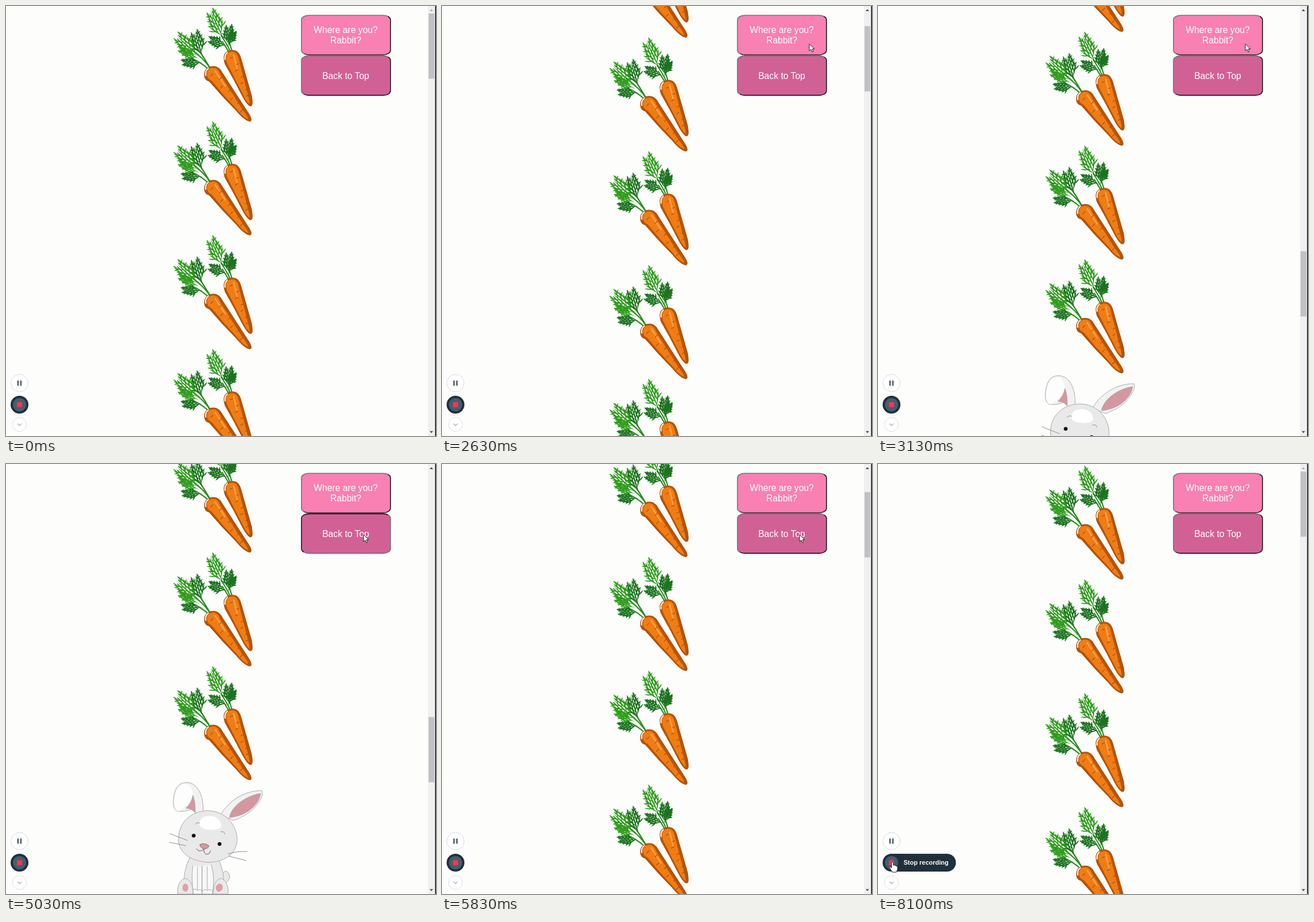
Write an HTML page that moves like this. It is 748 by 748 pixels and loops after 8170 ms.

```html
<!DOCTYPE html>
<html lang="en">
<head>
<meta charset="utf-8">
<title>Where is the rabbit?</title>
<style>
  html, body { margin: 0; width: 100%; height: 100%; overflow: hidden; background: #fdfdfc; }
  svg { display: block; width: 748px; height: 748px; }
  text { fill: #fff; font-family: "Liberation Sans", Arial, sans-serif; }
  .button { stroke: url(#raised); stroke-width: 1.6px; }
  .button.pressed { stroke: url(#sunken); }
  .caption { font-size: 15.7px; text-anchor: middle; }
</style>
</head>
<body>
<svg viewBox="0 0 748 748">
  <defs>
    <linearGradient id="raised" x2="1" y2="1">
      <stop offset=".5" stop-color="#77706f"/><stop offset=".5" stop-color="#21151b"/>
    </linearGradient>
    <linearGradient id="sunken" x2="1" y2="1">
      <stop offset=".5" stop-color="#21151b"/><stop offset=".5" stop-color="#77706f"/>
    </linearGradient>
    <clipPath id="pillClip"><rect id="pillWindow" x="8" y="678" height="31" rx="15.500"/></clipPath>
    <g id="carrots">
      <g id="leaves"></g>
      <g stroke="#a64d06" stroke-width="1.200" stroke-linejoin="round">
        <path fill="#b95407" d="M379.500 92C378 82 386 77 394 77C402 77 406 82 408.500 91L427 156C429 168 429 174 425 174C420 172 414 162 409 152L397 129L383 104Q380 100 379.500 92Z"/>
        <path fill="#b95407" d="M345.500 122C344 112 351 105 361 105C368 105 373 110 376 116L420 184C427 194 428 200 424 200.500C417 199 406 189 400 181L377 157L354 131Q346 129 345.500 122Z"/>
      </g>
      <path fill="#f07d13" d="M383 92C382 84 387 79.500 394 79.500C400 80 403 84 404.500 91L421 155Q425 170 423 170C418 166 414 158 411 151L399 128L387 104Q384 100 383 92Z"/>
      <path fill="#f07d13" d="M350 121C348 113 353 107.500 361 107.500C367 108 370 112 372 118L411 180Q422 194 421 197C414 194 407 187 402 180L379 155L358 130Q351 127 350 121Z"/>
      <g fill="none" stroke-linecap="round">
        <path stroke="#f9a04b" stroke-width="2.500" d="M396 85L402 109M364 113L381 139"/>
        <path stroke="#fff" stroke-width="2" d="M381 93Q380 85 385 81M347.500 121Q346 113 352 108.500"/>
        <path id="marks" stroke="#a94a06" stroke-width="1.200"/>
      </g>
    </g>
    <g id="rabbit" stroke="#a9a9ac" stroke-width="1" stroke-linejoin="round">
      <path fill="#e9e9ea" d="M376 713Q383 704 387 712Q393 720 383 728H374Z"/>
      <path fill="#e9e9ea" d="M320 684Q307 708 309 748H379Q382 708 367 682Z"/>
      <path fill="#f8f8f8" d="M325 699Q322 720 326 748H341V700M341 700V748H359Q364 720 357 697"/>
      <path fill="none" d="M333 701V741M350 700V741M324 742q5-5 9 0q5-4 8 2q4-6 9-2q5-4 9 1"/>
      <path fill="#e9e9ea" d="M299 748C297 736 301 724 311 721C321 722 326 734 325 748ZM361 748C360 734 365 722 374 721C384 724 388 737 386 748Z"/>
      <g fill="#dfa0a6" stroke="none">
        <ellipse cx="312" cy="737" rx="5" ry="7"/>
        <ellipse cx="371" cy="737" rx="6" ry="7" transform="rotate(18 371 737)"/>
      </g>
      <path fill="#f2f2f2" d="M330 613L328 596Q318 606 299 604Q291 602 291 588C292 566 299 554 314 554C332 554 344 574 343 606Z"/>
      <path fill="#d5979f" d="M325 576Q330 588 329 606Q321 598 313 599Q324 588 325 576Z"/>
      <path fill="#fdfdfd" d="M292 592C293 568 300 557 314 557Q324 560 325 575Q321 592 300 604Q293 602 292 592Z" stroke="none"/>
      <path fill="#f2f2f2" d="M373 611C386 587 414 568 445 568Q449 574 440 588C428 606 414 613 396 620Z"/>
      <path fill="#d5979f" d="M389 613C394 594 418 577 443 573Q441 589 423 603Q408 613 389 615Z"/>
      <path fill="#e9e9ea" d="M300 655C299 624 321 604 351 603C382 604 402 627 402 655C400 681 377 692 353 693C322 691 302 678 300 655Z"/>
      <path fill="#fff" stroke="none" d="M336 626C338 612 352 610 364 614Q376 621 374 632Q366 638 354 636Q338 636 336 626Z"/>
      <path fill="none" stroke="#8d8d90" d="M329 627q3-5 8-2M373 640q6-2 8 4M285 643L316 655M284 658L313 664M386 678Q402 673 420 674M387 682L418 690"/>
      <path fill="none" stroke="#555" d="M331 669Q337 677 344 670Q344 679 350 679Q355 678 356 673"/>
      <path fill="#d5979f" stroke="#9a686d" d="M337 662Q345 658 353 664Q352 669 345 670Q338 668 337 662Z"/>
      <g fill="#111" stroke="none"><circle cx="326.500" cy="646.500" r="3.300"/><circle cx="371.500" cy="661" r="3.300"/></g>
    </g>
  </defs>

  <g id="page"></g>

  <path fill="#f0f0f1" d="M734 0h12.500v748h-12.500z"/>
  <path fill="#0c0b1d" d="M746.500 0h1.500v748h-1.500z"/>
  <path id="up" d="M737 9l3-3.500l3 3.500z"/>
  <path fill="#4a4a4a" d="M737 739.500l3 3.500l3-3.500z"/>
  <rect id="thumb" x="735" width="10" height="113.500" fill="#c1c1c3"/>

  <rect class="button" id="find" x="514" y="16.200" width="154.800" height="68.800" rx="13" ry="8" fill="#f880b2"/>
  <rect class="button" id="back" x="514" y="86.600" width="154.800" height="68.800" rx="13" ry="8" fill="#d16195"/>
  <text class="caption" x="591" y="47">Where are you?</text>
  <text class="caption" x="591" y="65">Rabbit?</text>
  <text class="caption" x="591" y="126.500">Back to Top</text>

  <circle cx="23.500" cy="656" r="15" fill="#fff" stroke="#dadae2"/>
  <path fill="#53636d" d="M19.500 651.500h2.800v9h-2.800zM24.500 651.500h2.800v9h-2.800z"/>
  <g clip-path="url(#pillClip)">
    <path fill="#20303b" d="M8 678h128v31h-128z"/>
    <text id="label" x="44.500" y="697" font-size="11" font-weight="bold">Stop recording</text>
  </g>
  <circle cx="23.500" cy="693.500" r="11.500" fill="#465d6d"/>
  <rect x="19" y="689" width="9" height="9" rx="1" fill="#ee3854"/>
  <circle cx="23.500" cy="728" r="12" fill="#fff" stroke="#dfdfe2"/>
  <path fill="none" stroke="#abb2b8" stroke-width="1.300" d="M20 726.500l3.500 3.500l3.500-3.500"/>

  <g id="cursor" fill="#fff" stroke="#222" stroke-width="1" stroke-linejoin="round">
    <path id="arrow" d="M0 0V12L3 9.500L5 14L7 13L5 8.700H9Z"/>
    <path id="hand" d="M-1.500 1Q0-1 1.500 1V6Q3 4.500 4 6.500Q6 5 6.500 7.500Q9 6.500 9 9V13L7 18H0L-4 12Q-6 9-4 8.500L-1.500 10.500Z"/>
  </g>
</svg>

<script>
const LOOP = 8170, SPACING = 198, CARROTS = 17, RABBIT_SCROLL = 2819;
const $ = id => document.getElementById(id);
const clamp = v => Math.max(0, Math.min(1, v));
const progress = (t, start, duration) => clamp((t - start) / duration);

// Foliage: slender pointed leaflets, swept forward along branching fronds
function leaflet(x, y, angle, length, width) {
  const dx = Math.cos(angle), dy = Math.sin(angle);
  const mx = x + dx * length * .55, my = y + dy * length * .55;
  return `M${x} ${y}Q${mx - dy * width} ${my + dx * width} ${x + dx * length} ${y + dy * length}` +
         `Q${mx + dy * width} ${my - dx * width} ${x} ${y}Z`;
}
function frond(x0, y0, x1, y1, reach, color) {
  const angle = Math.atan2(y1 - y0, x1 - x0), length = Math.hypot(x1 - x0, y1 - y0);
  let d = leaflet(x0, y0, angle, length, 2.4);
  for (let i = 0; i < 4; i++) {
    for (const side of [-1, 1]) {
      const t = .2 + i * .18 + side * .04, size = reach * (1.15 - .7 * t);
      const x = x0 + (x1 - x0) * t, y = y0 + (y1 - y0) * t, a = angle + side * .55;
      d += leaflet(x, y, a, size, 2.5);
      for (const [along, turn] of [[.3, -.5], [.45, .5], [.6, -.4]]) {
        d += leaflet(x + Math.cos(a) * size * along, y + Math.sin(a) * size * along,
                     a + turn * side, size * .52, 2.1);
      }
    }
  }
  return `<path fill="${color}" d="${d}"/>`;
}
const DARK = '#1d7220', LIGHT = '#2f9c1d';
$('leaves').innerHTML =
  '<path fill="none" stroke="#2b8d20" stroke-width="2.2" d="M390 79Q385 67 374 51M393 78Q389 66 387 56M387 79L376 61M355 108Q344 92 325 77M351 109Q339 98 323 91M354 106Q344 89 334 75"/>' +
  frond(387, 71, 388, 35, 20, DARK) + frond(387, 71, 397, 44, 14, DARK) + frond(385, 70, 354, 58, 18, DARK) +
  frond(380, 60, 355, 8, 26, LIGHT) +
  frond(343, 91, 328, 45, 24, DARK) + frond(342, 99, 306, 98, 17, DARK) +
  frond(339, 91, 297, 52, 28, LIGHT) + frond(336, 92, 299, 73, 16, LIGHT);

let marks = '';
for (let i = 0; i < 7; i++) {
  const side = i % 2 ? 4 : -3;
  marks += `M${393 + i * 4.3 + side * (1 - i * .09)} ${91 + i * 11}l4-2`;
  marks += `M${359 + i * 8.3 + side * (1 - i * .09)} ${120 + i * 10.5 - side * .6}l4-4`;
}
$('marks').setAttribute('d', marks);

$('page').innerHTML =
  Array.from({ length: CARROTS }, (_, i) => `<use href="#carrots" y="${i * SPACING}"/>`).join('') +
  `<use href="#rabbit" y="${RABBIT_SCROLL}"/>`;

// cubic-bezier(.42, 0, .58, 1)
function easeInOut(x) {
  let low = 0, high = 1;
  for (let i = 0; i < 24; i++) {
    const s = (low + high) / 2, r = 1 - s;
    if (1.26 * s * r * r + 1.74 * s * s * r + s ** 3 < x) low = s; else high = s;
  }
  return low * low * (3 - 2 * low);
}

const PATH = [ // time, x, y
  [570, 690, 250], [770, 676, 180], [970, 676, 180], [1370, 639, 66],
  [4070, 639, 66], [4370, 622, 123], [7100, 622, 123], [7270, 470, 270],
  [7500, 470, 270], [7760, 25, 692]
];
function cursorAt(t) {
  const next = PATH.findIndex(p => p[0] > t);
  if (next < 0) return PATH[PATH.length - 1].slice(1);
  if (next === 0) return null;
  const [t0, x0, y0] = PATH[next - 1], [t1, x1, y1] = PATH[next];
  const k = (t - t0) / (t1 - t0);
  return [x0 + (x1 - x0) * k, y0 + (y1 - y0) * k];
}

function render(t) {
  const scroll = Math.round(RABBIT_SCROLL *
    (easeInOut(progress(t, 2519, 700)) - easeInOut(progress(t, 5273, 700))));
  $('page').setAttribute('transform', `translate(0 ${-scroll})`);
  $('thumb').setAttribute('y', 13 + scroll / 6.6);
  $('up').setAttribute('fill', scroll ? '#4a4a4a' : '#a9a9a9');

  $('find').classList.toggle('pressed', t >= 2270 && t < 2500);
  $('back').classList.toggle('pressed', t >= 5030 && t < 5270);

  const open = 1 - (1 - progress(t, 7760, 300)) ** 2;
  $('pillWindow').setAttribute('width', 31 + 96.5 * open);
  $('label').setAttribute('opacity', open);

  const position = cursorAt(t), hovering = t >= 7760;
  $('cursor').style.display = position ? '' : 'none';
  if (position) $('cursor').setAttribute('transform', `translate(${position})`);
  $('arrow').style.display = hovering ? 'none' : '';
  $('hand').style.display = hovering ? '' : 'none';
}

const start = performance.now();
function tick() {
  render((performance.now() - start) % LOOP);
  requestAnimationFrame(tick);
}
tick();
</script>
</body>
</html>
```
